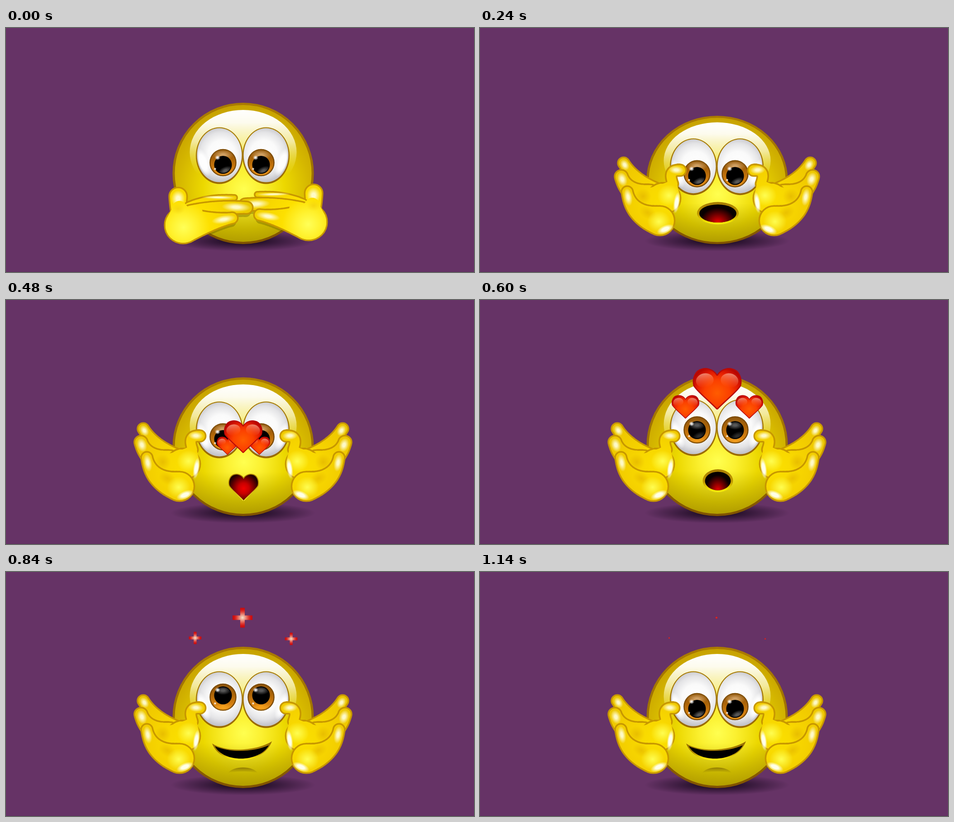
These frames come from a looping animation (1033x542 px, 1200 ms). An HTML page with a canvas:

```html
<!DOCTYPE html>
<html lang="en">
<head>
<meta charset="utf-8">
<title>Blown kiss</title>
<style>
html, body { margin: 0; width: 100%; height: 100%; overflow: hidden; background: #663366; }
canvas { display: block; }
</style>
</head>
<body>
<canvas id="stage" width="1033" height="542"></canvas>
<script>
const c = document.getElementById('stage').getContext('2d');
const STEP = 60, STEPS = 20;
const GOLD = '#c79700';
const clamp = (v, a = 0, b = 1) => Math.min(b, Math.max(a, v));
const mix = (a, b, p) => a + (b - a) * p;

function stops(g, list) {
  list.forEach(([p, col]) => g.addColorStop(p, col));
  return g;
}
const radial = (x, y, r, ...list) => stops(c.createRadialGradient(x, y, 0, x, y, r), list);
const vertical = (y0, y1, ...list) => stops(c.createLinearGradient(0, y0, 0, y1), list);

function paint(fill, stroke, width) {
  if (fill) { c.fillStyle = fill; c.fill(); }
  if (stroke) { c.strokeStyle = stroke; c.lineWidth = width; c.stroke(); }
}

function ellipse(x, y, rx, ry) {
  c.beginPath();
  c.ellipse(x, y, rx, ry, 0, 0, 7);
}

function oval(x, y, rx, ry, fill, stroke, width) {
  ellipse(x, y, rx, ry);
  paint(fill, stroke, width);
}

// Runs fn with its own canvas state
function scoped(fn) {
  c.save();
  fn();
  c.restore();
}

// Soft ellipse that fades to nothing; rgb is "r,g,b"
function glow(x, y, rx, ry, turn, rgb, alpha, core = 0) {
  scoped(() => {
    c.translate(x, y);
    c.rotate(turn);
    c.scale(rx, ry);
    c.fillStyle = radial(0, 0, 1, [0, `rgba(${rgb},${alpha})`], [core, `rgba(${rgb},${alpha})`], [1, `rgba(${rgb},0)`]);
    c.fillRect(-1, -1, 2, 2);
  });
}

function heartPath(x, y, w, h) {
  const top = y - h / 2, r = w / 2;
  c.beginPath();
  for (const s of [1, -1]) {
    const bend = (...p) => c.bezierCurveTo(...p.map((v, i) => i % 2 ? top + h * v : x + s * r * v));
    c.moveTo(x, top + h * .17);
    bend(.18, -.01, .5, -.01, .62, .01);
    bend(.9, .04, 1.05, .24, .97, .42);
    bend(.84, .56, .35, .78, 0, 1);
  }
}

const headPath = () => ellipse(523.5, 323, 153.5, 154.5);

function head(drop) {
  const s = (314 - drop) / 314;
  scoped(() => {
    c.translate(0, 480 * (1 - s));
    c.scale(1, s);
    headPath();
    paint(radial(525, 358, 200, [0, '#ffff50'], [.2, '#fbf030'], [.45, '#ecd800'], [.72, '#d5b700'], [1, '#c29a00']));
    paint(vertical(380, 480, [0, 'rgba(150,140,0,0)'], [1, 'rgba(150,132,0,.65)']),
      vertical(166, 480, [0, '#aa7a00'], [.6, '#9c7000'], [1, '#805200']), 5);
    oval(523.5, 276, 118, 94, vertical(182, 325, [0, '#fff'], [.2, 'rgba(255,255,250,.95)'],
      [.5, 'rgba(255,253,215,.72)'], [.75, 'rgba(255,250,150,.35)'], [1, 'rgba(255,250,100,0)']));
  });
}

function eye(x, side, irisX, dy, look) {
  const y = 283.5 + dy;
  oval(x, y, 52, 63, vertical(y - 62, y + 62, [0, '#a87c00'], [1, '#9a6a00']));
  oval(x, y - 1, 49.5, 60, radial(x - 5 * side, y - 4, 66, [0, '#fff'], [.45, '#fafafa'], [.72, '#e4e4e6'], [1, '#b9b9c0']));
  scoped(() => {
    ellipse(x, y - 1, 47, 57);
    c.clip();
    glow(x + side * 36, y + 15, 14, 34, side * .35, '255,255,255', .95, .5);
  });
  iris(irisX, 299 + dy + look, clamp(-look / 21));
}

function iris(x, y, up) {
  const lift = clamp(up * 2);
  oval(x, y, 28.5, 29, vertical(y - 30, y + 30, [0, '#8a5208'], [.4, '#ad6508'], [.75, '#d47f10'], [1, '#ee9a20']), '#7c4a02', 2.5);
  glow(x, y - 17, 23, 12, 0, '235,195,145', mix(.65, .1, lift), .2);
  glow(x, y + 22, 20, 8, 0, '255,170,30', mix(.2, .8, up));
  const py = y + mix(5, -4, up);
  oval(x, py, 19.5, 20, '#000');
  scoped(() => {
    ellipse(x, py, 18, 18);
    c.clip();
    glow(x + 5, py + 13, 17, 9, -.4, '125,125,125', .7 * (1 - up), .2);
    glow(x, py - 11, 18, 10, 0, '125,125,125', .7 * lift, .2);
  });
  glow(x - 12, y - mix(11, 16, up), 6, 5.5, 0, '255,255,255', .9, .25);
  glow(x - 17.5, y + 14, 3, 3, 0, '255,255,255', .9, .3);
}

function openMouth(x, y, rx, ry) {
  oval(x, y - .5, rx + 5, ry + 5, vertical(y - ry - 5, y + ry + 5, [0, '#a67a00'], [.55, '#c29b00'], [.85, '#f0e000'], [1, '#f4ec10']));
  oval(x, y, rx, ry, '#080000');
  scoped(() => {
    ellipse(x, y, rx, ry);
    c.clip();
    glow(x, y + ry, rx * .95, ry * 1.65, 0, '215,0,0', 1, .1);
  });
}

function heartMouth(x, y) {
  heartPath(x, y, 64, 57);
  paint(null, vertical(y - 30, y + 30, [0, '#a87c00'], [.5, '#c49c00'], [1, '#f4e830']), 4);
  paint(radial(x, y + 2, 34, [0, '#f00000'], [.35, '#c80000'], [.75, '#600000'], [1, '#200000']));
}

// Crescent between two sagging curves
function crescent(x0, y0, x1, y1, sagTop, sagLow, inset, fill) {
  c.beginPath();
  c.moveTo(x0, y0);
  c.bezierCurveTo(x0 + inset, y0 + sagTop, x1 - inset, y1 + sagTop, x1, y1);
  c.bezierCurveTo(x1 - inset * .6, y1 + sagLow, x0 + inset * .6, y0 + sagLow, x0, y0);
  paint(fill);
}

function smile() {
  crescent(455, 381, 587, 376, 21, 53, 32, vertical(376, 419, [0, '#966c00'], [.55, '#a88000'], [.85, '#f0dc00'], [1, '#fff020']));
  crescent(461, 387, 580, 385, 15, 38, 34, '#000');
  crescent(490, 447, 556, 447, -17, -5, 10, vertical(434, 447, [0, 'rgba(120,95,0,.75)'], [1, 'rgba(150,130,0,0)']));
}

// Tapered limb: circles along a bent spine from tip to root
function limb(tip, mid, root, r0, r1, gloss = 0, edge = 7) {
  const path = new Path2D(), n = 70;
  for (let i = 0; i <= n; i++) {
    const t = i / n, r = mix(r0, r1, t ** 1.5);
    const [x, y] = [0, 1].map(k => mix(mix(tip[k], mid[k], t), mix(mid[k], root[k], t), t));
    path.moveTo(x + r, y);
    path.arc(x, y, r, 0, 7);
  }
  return { path, tip, r: r0, gloss, edge, turn: Math.atan2(mid[1] - tip[1], mid[0] - tip[0]) };
}
const join = (tip, mid, root, r0, r1) => limb(tip, mid, root, r0, r1, 0, 0);

const COVER = [
  limb([380, 374], [380, 388], [380, 404], 18, 15, 18),
  limb([504, 377], [450, 376], [408, 404], 4.5, 17, 38),
  limb([531, 399], [470, 396], [410, 416], 12, 22, 32),
  limb([499, 422], [448, 431], [391, 438], 11, 39, 27),
  join([383, 400], [385, 412], [391, 438], 16, 39),
  join([424, 408], [410, 412], [391, 438], 10, 39)
];
const OPEN = [
  limb([303, 286], [325, 322], [374, 346], 11, 15, 13),
  limb([298, 316], [310, 354], [360, 364], 13, 29, 16),
  limb([428, 302], [399, 300], [412, 332], 11, 10, 17),
  limb([395, 364], [392, 364], [388, 364], 32, 32),
  join([411, 331], [408, 342], [395, 364], 10, 32),
  join([336, 357], [355, 363], [395, 364], 14, 32),
  limb([311, 350], [320, 402], [383, 414], 11, 31, 20)
];

function drawLimbs(parts, skin) {
  for (const p of parts) {
    if (p.edge) {
      c.strokeStyle = GOLD;
      c.lineWidth = p.edge;
      c.stroke(p.path);
    }
    c.fillStyle = skin;
    c.fill(p.path);
    if (!p.gloss) continue;
    const back = Math.max(0, p.gloss - p.r * .75);
    glow(p.tip[0] + back * Math.cos(p.turn), p.tip[1] + back * Math.sin(p.turn),
      p.gloss, p.r * .85, p.turn, '255,254,220', .9, .25);
  }
}

function coverHand() {
  drawLimbs(COVER, radial(392, 443, 165, [0, '#ffff58'], [.16, '#fff230'], [.35, '#fde000'], [.75, '#f3d000'], [1, '#e6c600']));
  glow(380, 402, 15, 12, 0, '225,175,0', .3);
}

function castShadow() {
  c.translate(-2, 9);
  c.fillStyle = 'rgba(95,80,0,.35)';
  COVER.forEach(p => p.gloss && c.fill(p.path));
}

function openHand() {
  drawLimbs(OPEN, radial(392, 372, 135, [0, '#fbe000'], [.3, '#f8d800'], [.65, '#f2cc00'], [1, '#eac400']));
  glow(346, 360, 18, 18, 0, '214,160,0', .45);
  glow(356, 396, 20, 14, .5, '214,160,0', .4);
  for (const [x, y] of [[403, 358], [381, 416]]) glow(x, y, 26, 24, 0, '255,255,85', .95);
  glow(420, 374, 7, 24, .15, '255,255,235', 1, .45);
  glow(395, 433, 20, 9, -.4, '255,255,230', 1, .4);
}

// Left side as drawn, right side flipped about axis / 2 and moved
function pair(fn, axis, dy, dx = 0, leftDy = 0) {
  scoped(() => { c.translate(axis, dy); c.scale(-1, 1); fn(); });
  scoped(() => { c.translate(dx, leftDy); fn(); });
}

function hands(k) {
  if (k < 4) {
    scoped(() => { headPath(); c.clip(); pair(castShadow, 1059, -7); });
    pair(coverHand, 1059, -7);
    return;
  }
  const near = 14 * clamp((6 - k) / 2);
  pair(openHand, 1046 - near, near, near, near);
}

function redHeart(x, y, w) {
  const h = w * .855;
  heartPath(x, y, w - 3, h - 3);
  paint(radial(x, y + h * .1, w * .57, [0, '#ff5c00'], [.45, '#fb4000'], [.75, '#e41c00'], [1, '#b60400']), '#b80a08', w * .025);
  for (const s of [-1, 1]) scoped(() => {
    c.translate(x + s * w * .25, y - h * .2);
    c.rotate(s * .2);
    oval(0, 0, w * .18, h * .17, vertical(-h * .17, h * .17, [0, 'rgba(255,205,180,.6)'], [.4, 'rgba(255,160,120,.4)'], [1, 'rgba(255,120,60,0)']));
  });
}

function spark(x, y, r) {
  const a = Math.max(r * .23, 1);
  c.beginPath();
  c.rect(x - r, y - a, r * 2, a * 2);
  c.rect(x - a, y - r, a * 2, r * 2);
  const heat = clamp(r / 8);
  paint(radial(x, y, r, [0, heat < .5 ? '#cc0a14' : '#f6e4cc'], [.6, '#dc3c34'], [.8, '#d41414'], [1, '#c40c10']));
}

function kisses(k) {
  if (k < 7) return;
  if (k < 13) {
    const p = (k - 6) / 4;
    const grow = (from, full, end) => p < 1 ? mix(from, full, p) : mix(full, end, (p - 1) * 2);
    for (const s of [-1, 1]) redHeart(524 + s * 70.5 * p, mix(410, 237.5, p), grow(36, 63, 75));
    redHeart(523.5, grow(410, 197.5, 101), grow(64, 109, 118));
    return;
  }
  const r = 22 - 19.5 * clamp((k - 14) / 5) ** 2.7;
  spark(522, 101.5, r);
  spark(417.5, 146.5, r * .63);
  spark(629.5, 148.5, r * .63);
}

function mouth(k) {
  if (k < 4) return;
  if (k < 5) openMouth(525, 412, 41, 20);
  else if (k < 9) heartMouth(524.5, 416.5);
  else if (k < 12) openMouth(525, 402, 28.5, 20.5);
  else smile();
}

function draw(k) {
  c.lineJoin = 'round';
  c.fillStyle = '#663366';
  c.fillRect(0, 0, 1033, 542);
  c.fillStyle = '#5d2f5d';
  c.fillRect(0, 541, 1033, 1);
  const drop = k < 4 ? k * 7.25 : 29 * clamp((9 - k) / 5);
  const look = -21 * clamp((k - 8) / 4) * clamp((18 - k) / 3);
  glow(523, 473, 160, 23, 0, '30,12,36', .95, .2);
  head(drop);
  eye(471, -1, 479, drop * .85, look);
  eye(574, 1, 563, drop * .85, look);
  mouth(k);
  hands(k);
  kisses(k);
}

const start = performance.now();
function tick() {
  draw(Math.floor((performance.now() - start) / STEP) % STEPS);
  requestAnimationFrame(tick);
}
tick();
</script>
</body>
</html>
```
